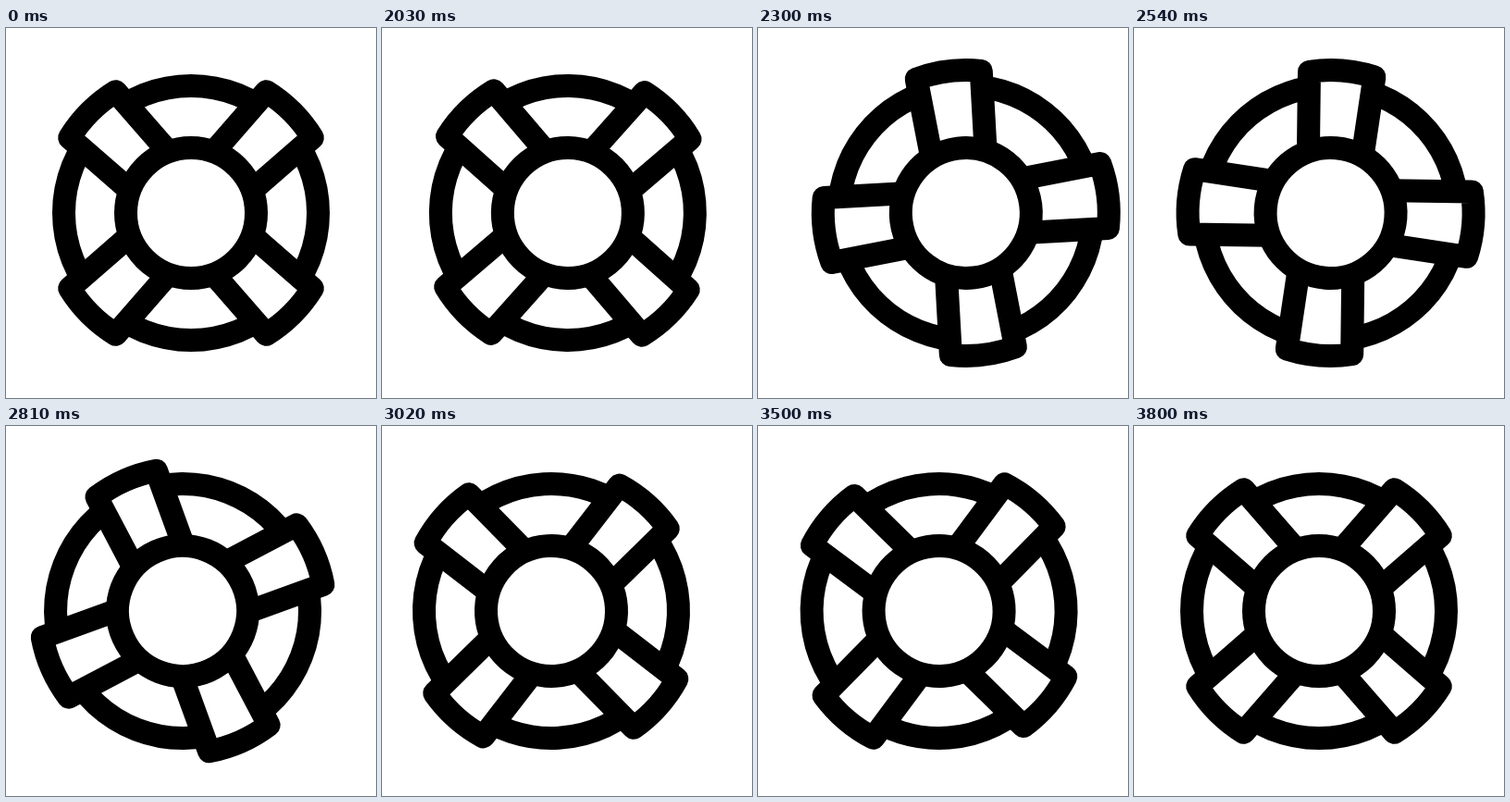
These frames come from a looping animation (400 by 400 pixels, 3.83 s). An HTML page:

```html
<!DOCTYPE html>
<html lang="en">
<head>
<meta charset="utf-8">
<title>Rolling lifebuoy</title>
<style>
  html, body { margin: 0; width: 100%; height: 100%; overflow: hidden; background: #fff; }
  svg { display: block; width: 100vw; height: 100vh; }
</style>
</head>
<body>
<svg viewBox="0 0 400 400">
  <defs>
    <path id="arm" d="M-29.4 -64L-35.3 -150.4A154.5 154.5 0 0 1 35.3 -150.4L29.4 -64"/>
  </defs>
  <g id="buoy" transform="translate(200 200)" fill="#fff" stroke="#000" stroke-width="25" stroke-linejoin="round">
    <circle r="137.5"/>
    <use href="#arm" transform="rotate(45)"/>
    <use href="#arm" transform="rotate(135)"/>
    <use href="#arm" transform="rotate(225)"/>
    <use href="#arm" transform="rotate(315)"/>
    <circle r="70.5"/>
  </g>
</svg>
<script>
const LOOP = 3830, REST = 2000, STEP = 30;

// Keys are [step, value]; the rotation lags behind the sideways roll.
const shiftKeys = [[0, 0], [9, 25], [34, -17], [58, 0]];
const turnKeys = [[0, 0], [15.2, 52], [39, -10.5], [59, 0]];

const buoy = document.getElementById('buoy');
const ease = p => p * p * (3 - 2 * p);

function valueAt(keys, n) {
  const i = keys.findIndex(([at]) => at > n);
  if (i < 0) return keys[keys.length - 1][1];
  const [n0, v0] = keys[i - 1], [n1, v1] = keys[i];
  return v0 + (v1 - v0) * ease((n - n0) / (n1 - n0));
}

function draw(ms) {
  const n = Math.max(0, Math.floor((ms % LOOP - REST) / STEP));
  const x = 200 + valueAt(shiftKeys, n);
  buoy.setAttribute('transform', `translate(${x} 200) rotate(${valueAt(turnKeys, n)})`);
}

const start = performance.now();
function tick() {
  draw(performance.now() - start);
  requestAnimationFrame(tick);
}
tick();
</script>
</body>
</html>
```
